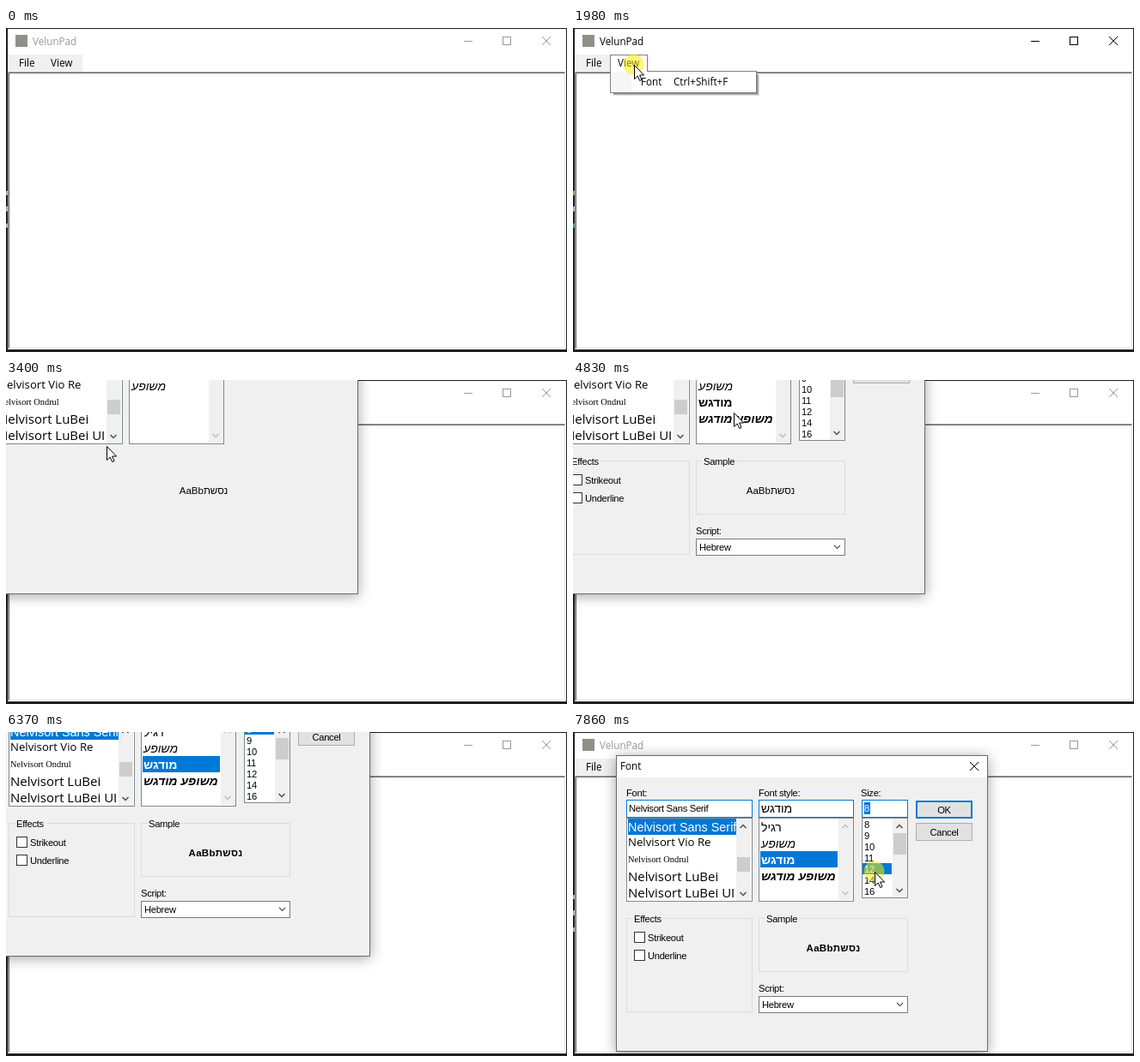
An HTML page for the animation above (8000 ms loop, 653 px wide and 378 px high).

```html
<!DOCTYPE html>
<html lang="en">
<head>
<meta charset="utf-8">
<title>Font dialog</title>
<style>
html, body { margin: 0; width: 100%; height: 100%; overflow: hidden; background: #1e1e1e; }
svg { display: block; }
text { white-space: pre; }
.ui { font: 11.7px "Open Sans", "Noto Sans", sans-serif; }
.form { font: 11.2px "Liberation Sans", Arial, sans-serif; letter-spacing: -.3px; }
.sample { font: 11.5px "Liberation Sans", "DejaVu Sans", sans-serif; }
.sans { font: 14.4px "Liberation Sans", Arial, sans-serif; }
.human { font: 13.2px "Open Sans", sans-serif; }
.tiny { font: 10.4px "Liberation Serif", serif; }
.wide { font: 15px "Open Sans", sans-serif; }
.style { font: 14px "Liberation Sans", "DejaVu Sans", sans-serif; }
.bold { font-weight: bold; }
.sample.bold { letter-spacing: .3px; }
.italic { font-style: italic; }
.shadow { filter: drop-shadow(0 2px 8px rgba(0, 0, 0, .36)); }
</style>
</head>
<body>
<svg id="stage" width="653" height="378" viewBox="0 0 653 378"></svg>
<script>
const LOOP = 8000, BLUE = '#0078d7';
const stage = document.getElementById('stage');

const rect = (x, y, w, h, fill, extra = '') =>
  `<rect x="${x}" y="${y}" width="${w}" height="${h}" fill="${fill}" ${extra}/>`;
// One-pixel outline just inside x, y, right and bottom.
const box = (x, y, right, bottom, fill, stroke, extra) =>
  rect(x + .5, y + .5, right - x - 1, bottom - y - 1, fill, `stroke="${stroke}" ${extra || ''}`);
const text = (x, y, str, cls = 'form', fill = '#000', extra = '') =>
  `<text x="${x}" y="${y}" class="${cls}" fill="${fill}" ${extra}>${str}</text>`;
const line = (d, color, width = 1) =>
  `<path d="${d}" fill="none" stroke="${color}" stroke-width="${width}"/>`;
const group = (content, attrs) => `<g ${attrs}>${content}</g>`;
const chevron = (x, y, dir, color = '#505050', width = 1.5) =>
  line(`M${x - 3.5} ${y - 2 * dir}l3.5 ${3.5 * dir}l3.5 ${-3.5 * dir}`, color, width);
const cross = (x, y, color) => line(`M${x - 5} ${y - 5}l10 10m0 -10l-10 10`, color);

// Share of a move done at t, in n equal steps: the first at a, the last at b.
const stepped = (t, a, b, n) => t < a ? 0 :
  Math.min(n, Math.floor((t - a) / Math.max(1, b - a) * (n - 1) + 1e-6) + 1) / n;

function along(points, p) {
  const at = p * (points.length - 1), i = Math.min(Math.floor(at), points.length - 2);
  return points[i].map((v, k) => v + (points[i + 1][k] - v) * (at - i));
}

// Each move: start, end, steps, then the points it passes through.
function follow(moves, t) {
  let pos = moves[0][3];
  for (const [a, b, n, ...points] of moves) {
    if (t >= a) pos = along([pos, ...points], stepped(t, a, b, n));
  }
  return pos;
}

const dialogMoves = [
  [0, 0, 1, [-71, -123]],
  [6370, 6370, 1, [-57, -111]],
  [6440, 6650, 4, [0, 0]],
  [6720, 6720, 1, [2, 0]],
];
const cursorMoves = [
  [0, 0, 1, [483, 304]],
  [380, 640, 5, [186, 135]],
  [840, 1590, 12, [68, 43]],
  [1660, 1980, 6, [71, 43]],
  [2050, 2050, 1, [76, 55]],
  [2190, 2380, 4, [113, 67]],
  [2520, 3320, 13, [117, 77]],
  [3670, 4360, 11, [201, 45], [38, 30]],
  [4480, 4830, 6, [187, 38]],
  [5100, 5830, 12, [175, 25]],
  [6370, 6370, 1, [149, -61]],
  [6440, 6650, 4, [206, 50]],
  [6720, 6720, 1, [208, 50]],
  [6790, 7110, 6, [345, 98]],
  [7190, 7390, 4, [352, 98]],
  [7530, 7860, 6, [351, 163]],
];

function mainWindow(t) {
  const active = t >= 1400 && t < 2720;
  const ink = active ? '#000' : '#999';
  return rect(0, 0, 653, 378, '#1e1e1e')
    + rect(0, 190, 2, 5, active ? '#b09a50' : '#aaa')
    + rect(0, 208, 2, 6, '#aaa')
    + rect(0, 228, 2, 5, active ? '#3a9a8a' : '#aaa')
    + rect(2, 1, 650, 374, '#fff')
    + rect(2, 31, 87, 20, '#f0f0f0')
    + rect(11, 8, 14, 14, '#8f9088')
    + text(31, 20, 'VelunPad', 'ui', ink)
    + line('M533 15.5h10', ink) + box(578, 10, 588, 20, 'none', ink) + cross(629, 15, ink)
    + text(15, 45, 'File', 'ui')
    + (t >= 1400 && t < 1660 ? box(44, 32, 87, 50, '#b3d7f3', BLUE) : '')
    + text(52, 45, 'View', 'ui')
    + line('M2.5 374.5V51.5H651', '#a0a0a0') + line('M3.5 373.5V52.5H650', '#696969')
    + line('M3.5 373.5H650.5V52', '#e3e3e3');
}

function viewMenu(t) {
  if (t < 1660 || t >= 2590) return '';
  const hover = t >= 2190 ? box(46, 52, 212, 75, '#b3d7f3', BLUE) : '';
  return box(43, 31, 87, 53, '#fff', '#808080')
    + text(52, 45, 'View', 'ui')
    + group(
      rect(47, 54, 170, 25, '#000', 'opacity=".12"')
      + rect(47, 54, 169, 24, '#000', 'opacity=".2"')
      + rect(47, 54, 168, 23, '#000', 'opacity=".2"')
      + box(43, 50, 214, 76, '#fff', '#808080')
      + rect(44, 49, 42, 3, '#fff')
      + rect(44, 52, 24, 23, '#f6f6f6') + hover
      + text(79, 67, 'Font', 'ui') + text(117, 67, 'Ctrl+Shift+F', 'ui'),
      `opacity="${stepped(t, 1660, 1850, 4)}"`);
}

function scrollbar(x, up, down, thumb, size) {
  const color = size ? '#505050' : '#bdbdbd';
  return rect(x, 101, 17, down - 93, '#f0f0f0')
    + (size ? rect(x + 1, thumb, 15, size, '#cdcdcd') : '')
    + chevron(x + 8, up, -1, color) + chevron(x + 8, down, 1, color);
}

function fontList() {
  const maker = 'Nelvisort ';
  return text(60, 75, 'Font:')
    + box(60, 79, 207, 100, '#fff', BLUE) + text(63, 93, maker + 'Sans Serif')
    + box(60, 100, 207, 198, '#fff', '#828790')
    + rect(62, 101, 126, 19, BLUE)
    + text(62, 116, maker + 'Sans Serif', 'sans', '#fff')
    + text(62, 133, maker + 'Vio Re', 'human')
    + text(62, 152, maker + 'Ondrul', 'tiny')
    + text(62, 174, maker + 'LuBei', 'wide')
    + text(62, 193, maker + 'LuBei UI', 'wide')
    + scrollbar(188, 110, 189, 146, 17);
}

function styleList(t, painted) {
  const bold = t >= 5300, editing = t < 7190;
  const row = bold ? 2 : 0;
  const rows = [['רגיל', ''], ['משופע', 'italic'], ['מודגש', 'bold'], ['משופע מודגש', 'bold italic']];
  return text(214, 75, 'Font style:')
    + box(214, 79, 325, 100, '#fff', BLUE)
    + (editing ? rect(217, 82, 35, 15, BLUE) : '')
    + text(217, 94, rows[row][0], 'style', editing ? '#fff' : '#000')
    + box(214, 100, 325, 198, '#fff', '#828790')
    + rect(216, 101 + row * 19, 90, 19, BLUE)
    + rows.slice(0, painted ? 4 : 2).map(([name, cls], i) =>
        text(217, 116 + i * 19, name, 'style ' + cls, i === row ? '#fff' : '#000')).join('')
    + scrollbar(307, 110, 188);
}

function sizeList(t) {
  const editing = t >= 7190, row = t >= 7860 ? 4 : 0;
  return text(333, 75, 'Size:')
    + box(334, 79, 388, 100, '#fff', BLUE)
    + (editing ? rect(337, 82, 7, 14, BLUE) : '')
    + text(337, 93, '8', 'form', editing ? '#fff' : '#000')
    + box(334, 100, 388, 194, '#fff', '#828790')
    + rect(335, 101 + row * 13, 34, 13, BLUE)
    + [8, 9, 10, 11, 12, 14, 16].map((size, i) =>
        text(337, 112 + i * 13, size, 'form', i === row ? '#fff' : '#000')).join('')
    + scrollbar(370, 110, 185, 118, 25);
}

const button = (y, label, border) => box(397, y, 463, y + 21, '#e1e1e1', border)
  + text(430, y + 15, label, 'form', '#000', 'text-anchor="middle"');

const frame = (x, right, bottom, label, width) =>
  box(x, 217, right, bottom, 'none', '#dcdcdc')
  + rect(x + 7, 216, width, 3, '#f0f0f0') + text(x + 9, 222, label);

const checkbox = (y, label) => box(69, y, 82, y + 13, '#fff', '#333') + text(85, y + 11, label);

function dialog(t) {
  if (t < 3400) return '';
  const [dx, dy] = follow(dialogMoves, t);
  const sizes = t >= 3465, painted = t >= 3530;
  return group(
    box(48, 27, 481, 373, '#f0f0f0', '#6b6b6b', 'class="shadow"')
    + rect(49, 28, 431, 25, '#fff')
    + text(53, 44, 'Font', 'ui') + cross(465, 40, '#000')
    + fontList() + styleList(t, painted)
    + (sizes ? sizeList(t) + button(80, 'OK', BLUE)
        + rect(398.5, 81.5, 63, 18, 'none', `stroke="${BLUE}"`)
        + button(106, 'Cancel', '#adadad') : '')
    + (painted ? frame(60, 207, 327, 'Effects', 37)
        + checkbox(233, 'Strikeout') + checkbox(254, 'Underline')
        + frame(214, 388, 280, 'Sample', 39)
        + text(214, 303, 'Script:')
        + box(214, 308, 388, 328, '#fff', '#7a7a7a')
        + text(218, 322, 'Hebrew') + chevron(378.5, 318, 1, '#505050', 1.1) : '')
    + text(301, 256, 'AaBbנסשת', t >= 5300 ? 'sample bold' : 'sample', '#000', 'text-anchor="middle"'),
    `transform="translate(${Math.round(dx)} ${Math.round(dy)})"`);
}

function cursor(t) {
  if (t < 380 || (t >= 5830 && t < 6370)) return '';
  const [x, y] = follow(cursorMoves, t).map(Math.round);
  const halo = t < 3400 || t >= 6370
    ? '<circle cx="-.5" cy="-.5" r="12" fill="#fff000" opacity=".53"/>' : '';
  return group(halo
    + '<path d="M.5 .5V16.5L4.2 13L6.7 18.5L9 17.5L6.6 12H11.6Z" fill="#fff" stroke="#000"/>',
    `transform="translate(${x} ${y})"`);
}

let shown = '';
function draw(now) {
  const t = now % LOOP;
  const picture = mainWindow(t) + viewMenu(t) + dialog(t) + cursor(t);
  if (picture !== shown) stage.innerHTML = shown = picture;
}

let start;
function tick(now) {
  start ??= now;
  draw(now - start);
  requestAnimationFrame(tick);
}
draw(0);
requestAnimationFrame(tick);
</script>
</body>
</html>
```
